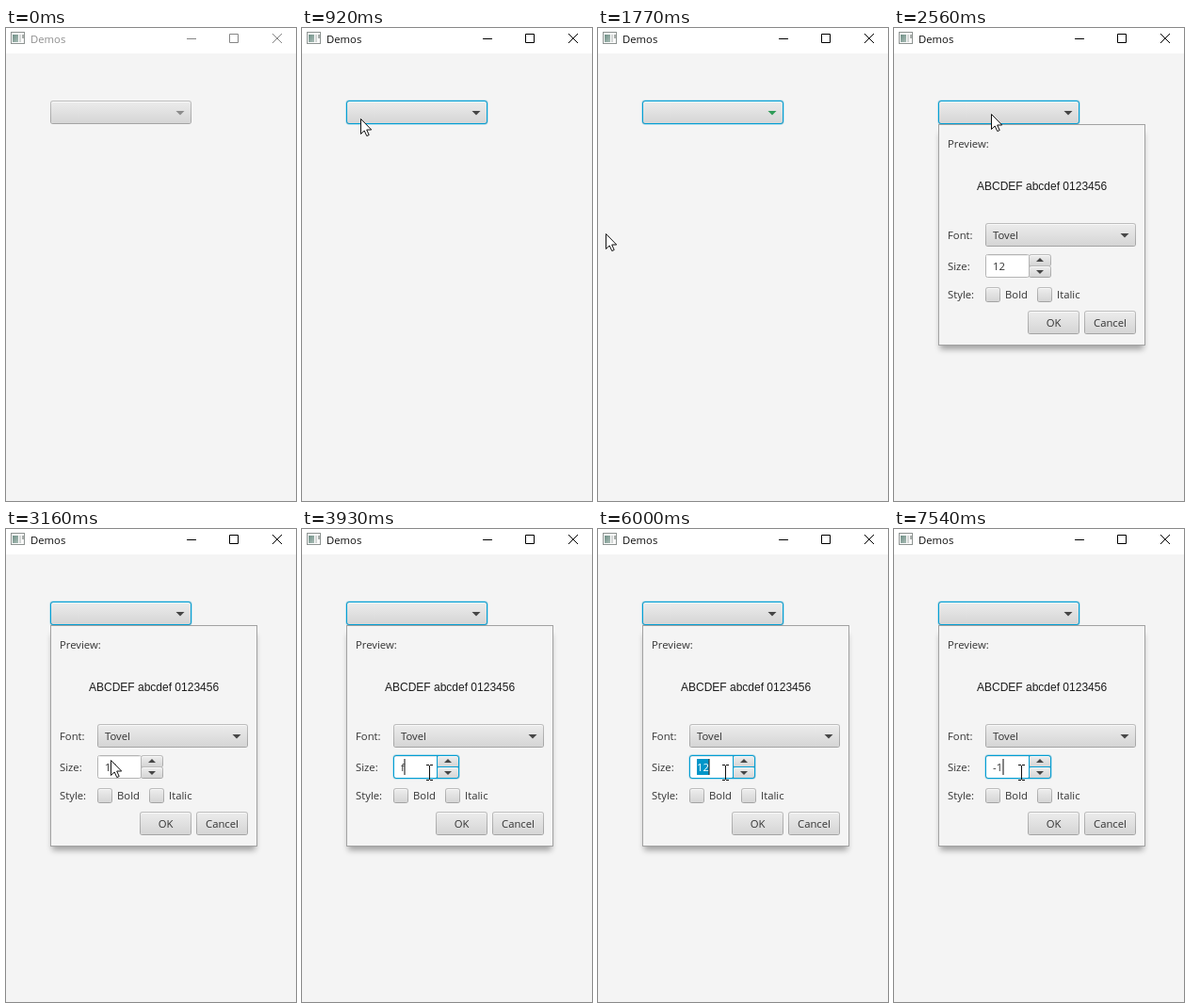
These frames come from a looping animation (308x502 px, 8000 ms). An HTML page:

```html
<!DOCTYPE html>
<html lang="en">
<head>
<meta charset="utf-8">
<title>Demos</title>
<style>
  html, body { margin: 0; width: 100%; height: 100%; overflow: hidden; background: #f4f4f4; }
  svg { display: block; width: 308px; height: 502px; cursor: default; }
  text { font: 11.3px "Open Sans", "Noto Sans", sans-serif; fill: #333; white-space: pre; }
  .sample { font: 12px "Liberation Sans", sans-serif; fill: #1c1c1c; }
  .mid { text-anchor: middle; }
  .ring { fill: none; stroke: #039ed3; }
  .glow { fill: none; stroke: #039ed3; stroke-opacity: .25; }
</style>
</head>
<body>
<svg viewBox="0 0 308 502" xmlns="http://www.w3.org/2000/svg">
  <defs>
    <linearGradient id="face" x2="0" y2="1">
      <stop stop-color="#ebebeb"/><stop offset="1" stop-color="#d5d5d5"/>
    </linearGradient>
    <linearGradient id="edge" x2="0" y2="1">
      <stop stop-color="#bdbdbd"/><stop offset="1" stop-color="#a3a3a3"/>
    </linearGradient>
    <linearGradient id="pane" x2="1" y2="1">
      <stop stop-color="#6f8f86"/><stop offset="1" stop-color="#a9bdb6"/>
    </linearGradient>
    <filter id="blur" x="-10%" y="-10%" width="120%" height="120%"><feGaussianBlur stdDeviation="3"/></filter>
    <clipPath id="below"><rect y="102" width="308" height="400"/></clipPath>
  </defs>

  <rect width="308" height="502" fill="#f4f4f4"/>
  <rect width="308" height="27" fill="#fff"/>
  <g id="icon">
    <rect x="5.5" y="4.5" width="14" height="12" fill="#fafafa" stroke="#8d9391"/>
    <rect x="7" y="7" width="6" height="8" fill="url(#pane)"/>
    <rect x="14" y="7" width="2" height="8" fill="#d3d6d5"/>
    <rect x="17" y="7" width="2" height="4" fill="#a9aeac"/>
  </g>
  <text id="title" x="26" y="16">Demos</text>
  <path id="controls" d="M192 11.5h10M237.5 6.5h9v9h-9zM283 6l10 10M293 6l-10 10" fill="none"/>

  <g id="main"></g>
  <g id="popup"></g>

  <path id="arrow" d="M.5.5V16.5L4.2 13 6.8 18.6 9.2 17.5 6.7 12H11.7Z" fill="#fff" stroke="#111" stroke-width="1"/>
  <path id="beam" d="M132 250.5h3M136 250.5h3M135.5 251v15M132 266.5h3M136 266.5h3" fill="none" stroke="#111"/>
</svg>
<script>
const $ = id => document.getElementById(id);
const LOOP = 8000, TICK = 76.94;
const OPEN = [[1160, 1620], [2560, LOOP]];

const button = (x, y, w, h, r = 3) =>
  `<rect x="${x}" y="${y}" width="${w}" height="${h}" rx="${r}" fill="url(#edge)"/>
   <rect x="${x + 1}" y="${y + 1}" width="${w - 2}" height="${h - 2}" rx="${r - 1}" fill="#f8f8f8"/>
   <rect x="${x + 1}" y="${y + 2}" width="${w - 2}" height="${h - 3}" rx="${r - 1}" fill="url(#face)"/>`;
const ring = (x, y, w, h) =>
  `<rect class="glow" x="${x - .5}" y="${y - .5}" width="${w + 1}" height="${h + 1}" rx="3.5"/>
   <rect class="ring" x="${x + .5}" y="${y + .5}" width="${w - 1}" height="${h - 1}" rx="2.5"/>`;
const label = (x, y, s, cls = "") => `<text x="${x}" y="${y}" class="${cls}">${s}</text>`;
const tri = (x, y, h, w = 4) => `<path d="M${x - w} ${y}h${2 * w}l${-w} ${h}z" fill="#464646"/>`;

$("main").innerHTML = button(47, 77, 150, 25) +
  `<g id="ring">${ring(47, 77, 150, 25)}</g><path id="drop" d="M180.5 88h9l-4.5 4.5z"/>`;

$("popup").innerHTML =
  `<rect x="49" y="112" width="216" height="229" fill="#000" opacity=".34" filter="url(#blur)" clip-path="url(#below)"/>
   <rect x="47.5" y="102.5" width="219" height="234" fill="#f4f4f4" stroke="#a2a2a2"/>` +
  label(57, 127, "Preview:") + label(88, 172, "ABCDEF abcdef 0123456", "sample") +
  label(57, 224, "Font:") + button(97, 207, 160, 25) + label(105, 224, "Tovel") + tri(245, 218, 4.5, 4.5) +
  label(57, 257, "Size:") + button(143, 240, 24, 13) + button(143, 252, 24, 13) +
  `<rect x="97.5" y="240.5" width="46" height="24" rx="2" fill="#fff" stroke="#b4b4b4"/>
   <path d="M98 241.5h45" stroke="#ececec"/>
   <g id="focus">${ring(97, 240, 70, 25)}<path class="ring" d="M143.5 240v25M143 252.5h24"/></g>` +
  tri(155, 248, -4) + tri(155, 257, 4) +
  `<rect id="sel" x="105" y="244" width="13" height="17" fill="#0096c9"/>` +
  `<text id="size" x="105" y="257"></text>
   <path id="caret" d="M0 244v17" stroke="#333" stroke-width="1.2"/>` +
  label(57, 287, "Style:") + button(97, 275, 16, 16) + label(118, 287, "Bold") +
  button(152, 275, 16, 16) + label(173, 287, "Italic") +
  button(142, 300, 55, 25) + label(169.5, 317, "OK", "mid") +
  button(202, 300, 55, 25) + label(229.5, 317, "Cancel", "mid");

// time, field text, caret x (0 = hidden), selected
const field = [
  [0, "12", 0], [3540, "12", 118], [3690, "12", 118, 1],
  [3930, "f", 109], [4080, "fa", 115], [4240, "fas", 119.5], [4390, "fasdf", 130.5], [4850, "fasdf", 0],
  [5160, "12", 105], [5620, "12", 0], [5850, "12", 0, 1], [6000, "12", 118, 1], [6460, "12", 0, 1],
  [6770, "-", 110], [7230, "-", 0], [7540, "-1", 116]
];

// time, pointer x, pointer y
const path = [
  [230, 130, 435], [450, 120, 330], [700, 84, 170], [920, 62, 96], [990, 62, 92], [1160, 62, 92],
  [1230, 25, 154], [1330, 8, 186], [1460, 0, 210], [1620, 3, 218], [1769, 8, 218], [1860, 8, 218],
  [2080, 50, 160], [2300, 103, 91], [2590, 103, 91], [2860, 30, 180], [3070, 85, 230], [3230, 135, 258]
];

function pointer(t) {
  const q = Math.floor((t + 8) / TICK) * TICK;
  const i = path.findIndex(p => p[0] > q);
  if (i < 1) return path[i ? path.length - 1 : 0].slice(1);
  const [t0, x0, y0] = path[i - 1], [t1, x1, y1] = path[i];
  const k = (q - t0) / (t1 - t0);
  return [Math.round(x0 + (x1 - x0) * k), Math.round(y0 + (y1 - y0) * k)];
}

const show = (id, on) => $(id).setAttribute("visibility", on ? "inherit" : "hidden");
const set = (id, name, v) => $(id).setAttribute(name, v);

function draw(t) {
  const active = t >= 230;
  $("title").style.fill = active ? "#111" : "#8f8f8f";
  set("controls", "stroke", active ? "#000" : "#858585");
  show("ring", active);
  set("drop", "fill", !active ? "#8c8c8c" : t >= 1620 && t < 1930 ? "#2f9c58" : "#464646");
  show("popup", OPEN.some(([a, b]) => t >= a && t < b));

  const [, text, caret, selected] = field.findLast(s => s[0] <= t);
  $("size").textContent = text;
  $("size").style.fill = selected ? "#fff" : "#333";
  show("sel", selected);
  show("caret", caret);
  set("caret", "transform", `translate(${caret} 0)`);
  show("focus", t >= 3540);

  const [x, y] = pointer(t);
  set("arrow", "transform", `translate(${x} ${y})`);
  show("arrow", active && t < 3230);
  show("beam", t >= 3230);
}

const start = performance.now();
function frame() {
  draw((performance.now() - start) % LOOP);
  requestAnimationFrame(frame);
}
draw(0);
requestAnimationFrame(frame);
</script>
</body>
</html>
```
